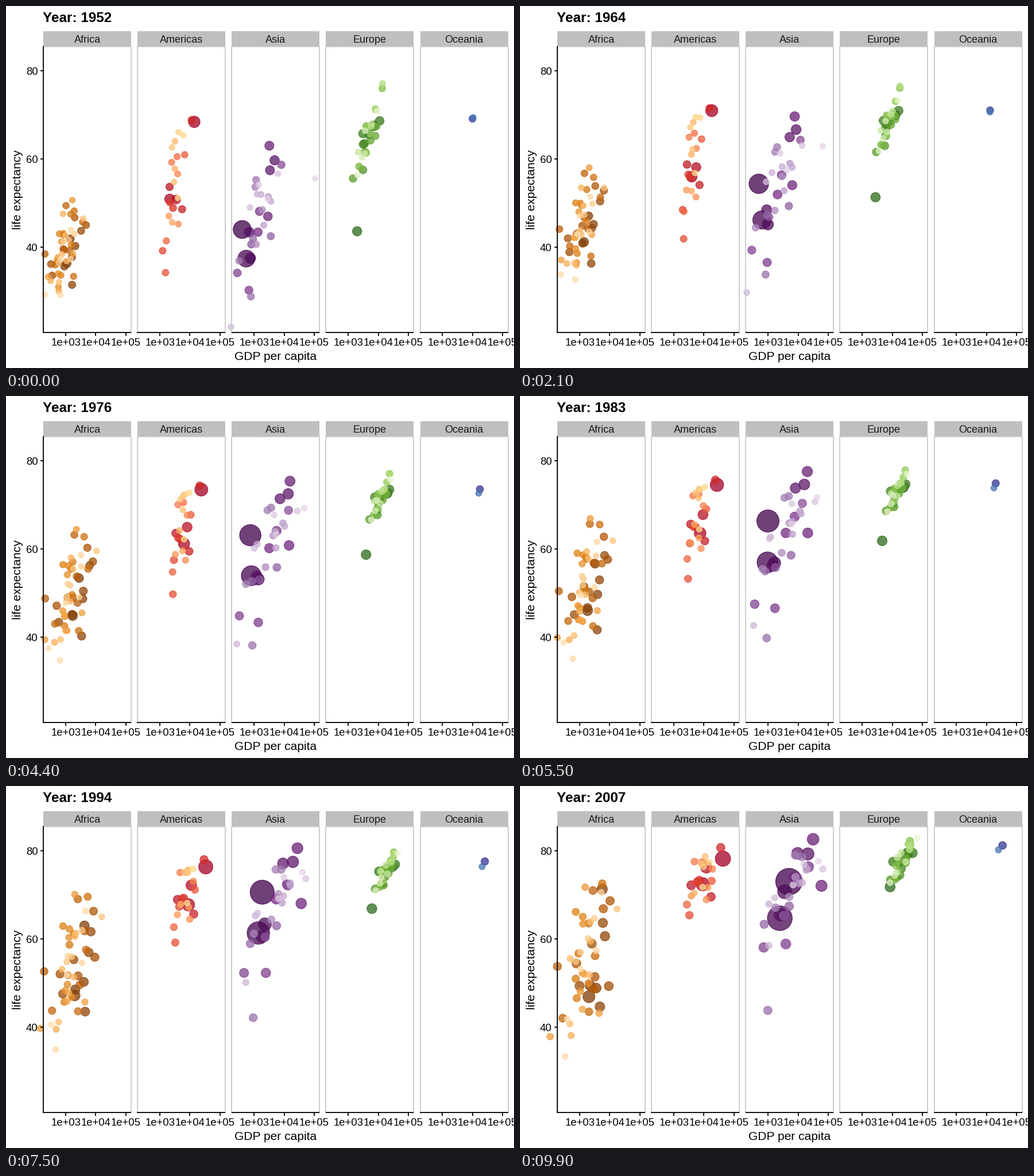
A matplotlib script that plays this animation: 885 by 632 pixels, repeating every 10 s.

```python
import numpy as np
import matplotlib.pyplot as plt
from matplotlib.animation import FuncAnimation
from matplotlib.colors import to_rgb
from matplotlib.patches import Rectangle

W, H, DPI = 885, 632, 100
PT = 72 / DPI
FRAMES = 100
T = np.linspace(0, 1, FRAMES)
TOP, BOTTOM, LEFT, WIDTH, PITCH = 71, 570, 65.3, 153, 164.05
ALPHA = 0.75

plt.rcParams["font.family"] = "Liberation Sans"
rng = np.random.default_rng(12)
fig = plt.figure(figsize=(W / DPI, H / DPI), dpi=DPI, facecolor="white")
ax = fig.add_axes((0, 0, 1, 1))
ax.set(xlim=(0, W), ylim=(H, 0))
ax.axis("off")


def life_y(v):
    return 113 + (80 - v) * 7.7


def gdp_x(log_gdp, left):
    return left + 38.9 + (log_gdp - 3) * 52.2


def curve(start, middle, end):
    """Parabola over the loop through three evenly spaced values."""
    return (start * (1 - T) * (1 - 2 * T) + middle * 4 * T * (1 - T)
            + end * T * (2 * T - 1))


def ramp(stops, t):
    rgb = np.array([to_rgb("#" + s) for s in stops.split()])
    pos = np.linspace(0, 1, len(rgb))
    return [np.interp(t, pos, rgb[:, c]) for c in range(3)] + [ALPHA]


def latent(n):
    """Unit normal scores that drift slowly, one row per dot."""
    a, b = rng.normal(size=(2, n, 1)).clip(-1.9, 1.9)
    z = a * np.cos(0.6 * T) + b * np.sin(0.6 * T)
    return (z - z.mean(axis=0)) / z.std(axis=0)


def cloud(n, gdp, gdp_sd, life, life_sd, corr, top, decay):
    """Correlated cloud: log gdp, life and population of n dots."""
    wealth, luck = latent(n), latent(n)
    health = corr * wealth + np.sqrt(1 - corr ** 2) * luck
    x = curve(*gdp) + curve(*gdp_sd) * wealth
    y = curve(*life) + curve(*life_sd) * health
    return x, y, top * np.exp(-np.arange(n) / decay)


def leader(pop, start, middle, end):
    """One prominent dot, led through three (gdp, life) points."""
    gdp, life = zip(start, middle, end)
    return curve(*np.log10(gdp)), curve(*life), pop


# name, palette from large to small, population growth, leaders, cloud
REGIONS = (
    ("Africa", "7F3B08 B35806 E08214 FDB863 FEE0B6", 3.9,
     [leader(135, (1077, 36.3), (1750, 45.5), (2014, 46.9)),
      leader(80, (1419, 41.9), (3000, 55), (5581, 71.3)),
      leader(44, (4725, 45), (8300, 57.5), (9270, 49.3))],
     cloud(49, (2.95, 3.17, 3.2), (0.3, 0.38, 0.45), (39, 50.5, 54.8),
           (5, 6.8, 9), 0.35, 70, 13)),
    ("Americas", "A50026 D73027 F46D43 FDAE61 FEE090", 2.6,
     [leader(301, (13990, 68.4), (25500, 74), (42952, 78.2)),
      leader(190, (2109, 50.9), (6900, 62.4), (9066, 72.4)),
      leader(108, (3478, 50.8), (8700, 66.4), (11978, 76.2)),
      leader(33, (11367, 68.8), (22500, 75), (36319, 80.7))],
     cloud(21, (3.47, 3.74, 3.9), (0.19, 0.18, 0.25), (53, 65.2, 73.2),
           (8.5, 6.5, 4.3), 0.6, 44, 6)),
    ("Asia", "40004B 762A83 9970AB C2A5CF E7D4E8", 2.75,
     [leader(1319, (400, 44), (850, 64.8), (4959, 73)),
      leader(1110, (547, 37.4), (870, 55.5), (2452, 64.7)),
      leader(223, (750, 37.5), (1500, 55), (3541, 70.7)),
      leader(169, (685, 43.4), (1300, 55), (2606, 65.5)),
      leader(127, (3217, 63), (18000, 76.5), (31656, 82.6)),
      leader(32, (779, 28.8), (880, 39), (975, 43.8)),
      leader(2.5, (108382, 55.6), (45000, 70.5), (47307, 77.6))],
     cloud(26, (3.18, 3.56, 3.83), (0.4, 0.52, 0.53), (47, 61.8, 71.3),
           (8, 7.5, 5.8), 0.7, 150, 6.5)),
    ("Europe", "276419 4D9221 7FBC41 B8E186 E6F5D0", 1.35,
     [leader(82, (7144, 67.5), (21500, 73.3), (32170, 79.4)),
      leader(71, (1969, 43.6), (4250, 60.3), (8458, 71.8))],
     cloud(28, (3.67, 4.12, 4.34), (0.25, 0.19, 0.24), (65.2, 72.4, 77.8),
           (4.8, 2.5, 2.8), 0.86, 61, 7.5)),
    ("Oceania", "313695 4575B4", 2.3,
     [leader(20.4, (10040, 69.1), (19000, 74.2), (34435, 81.2)),
      leader(4.1, (10557, 69.4), (17000, 73.2), (25185, 80.2))],
     None),
)


def tracks(left, stops, growth, leaders, crowd):
    """Paths (x, y, marker area) and colours of one panel, largest first."""
    dots = leaders + (list(zip(*crowd)) if crowd else [])
    dots.sort(key=lambda dot: -dot[2])
    paths = []
    for log_gdp, life, pop in dots:
        size = 2 + 10 * np.sqrt(pop * growth ** (T - 1) / 1319)
        area = (1.76 * (2.134 * size + 0.71) * PT) ** 2
        paths.append((gdp_x(log_gdp, left), life_y(life), area))
    return paths, [ramp(stops, t) for t in np.linspace(0, 1, len(dots))]


def label(x, y, text, px, **kw):
    kw = {"ha": "center", "va": "baseline", "color": "black", **kw}
    return ax.text(x, y, text, fontsize=px * PT, **kw)


def line(xs, ys):
    ax.plot(xs, ys, color="black", lw=1.8 * PT, solid_capstyle="butt", zorder=4)


paths, colors = [], []
for k, (name, *rules) in enumerate(REGIONS):
    left = LEFT + PITCH * k
    panel_paths, panel_colors = tracks(left, *rules)
    paths += panel_paths
    colors += panel_colors

    ax.add_patch(Rectangle((left, 43.5), WIDTH, TOP - 43.5, fc="#bfbfbf", ec="none"))
    ax.add_patch(Rectangle((left, TOP), WIDTH, BOTTOM - TOP, fc="none",
                           ec="#cccccc", lw=1.9 * PT, zorder=3))
    line((left - 0.9, left + WIDTH), (BOTTOM, BOTTOM))
    label(left + WIDTH / 2, 64, name, 18, color="#1a1a1a")
    for e in (3, 4, 5):
        x = gdp_x(e, left)
        line((x, x), (BOTTOM, BOTTOM + 5.5))
        label(x, 593.3, f"1e+0{e}", 18.5)

line((LEFT, LEFT), (TOP - 1, BOTTOM + 0.9))
for v in (40, 60, 80):
    line((LEFT - 5.5, LEFT), (life_y(v), life_y(v)))
    label(55.5, life_y(v) + 6.5, str(v), 18.5, ha="right")
label(469.8, 617.5, "GDP per capita", 21)
label(30, 320.5, "life expectancy", 21, rotation=90, ha="right", va="center")
title = label(64.5, 28, "", 24.3, ha="left", weight="bold")

paths = np.array(paths)
dots = ax.scatter(paths[:, 0, 0], paths[:, 1, 0], s=paths[:, 2, 0], c=colors,
                  edgecolors=colors, linewidths=1.25 * PT, zorder=2)


def draw(i):
    dots.set_offsets(paths[:, :2, i])
    dots.set_sizes(paths[:, 2, i])
    title.set_text(f"Year: {1952 + 55 * T[i]:.0f}")
    return dots, title


anim = FuncAnimation(fig, draw, frames=FRAMES, interval=100, repeat=True,
                     repeat_delay=0)
plt.show()
```
